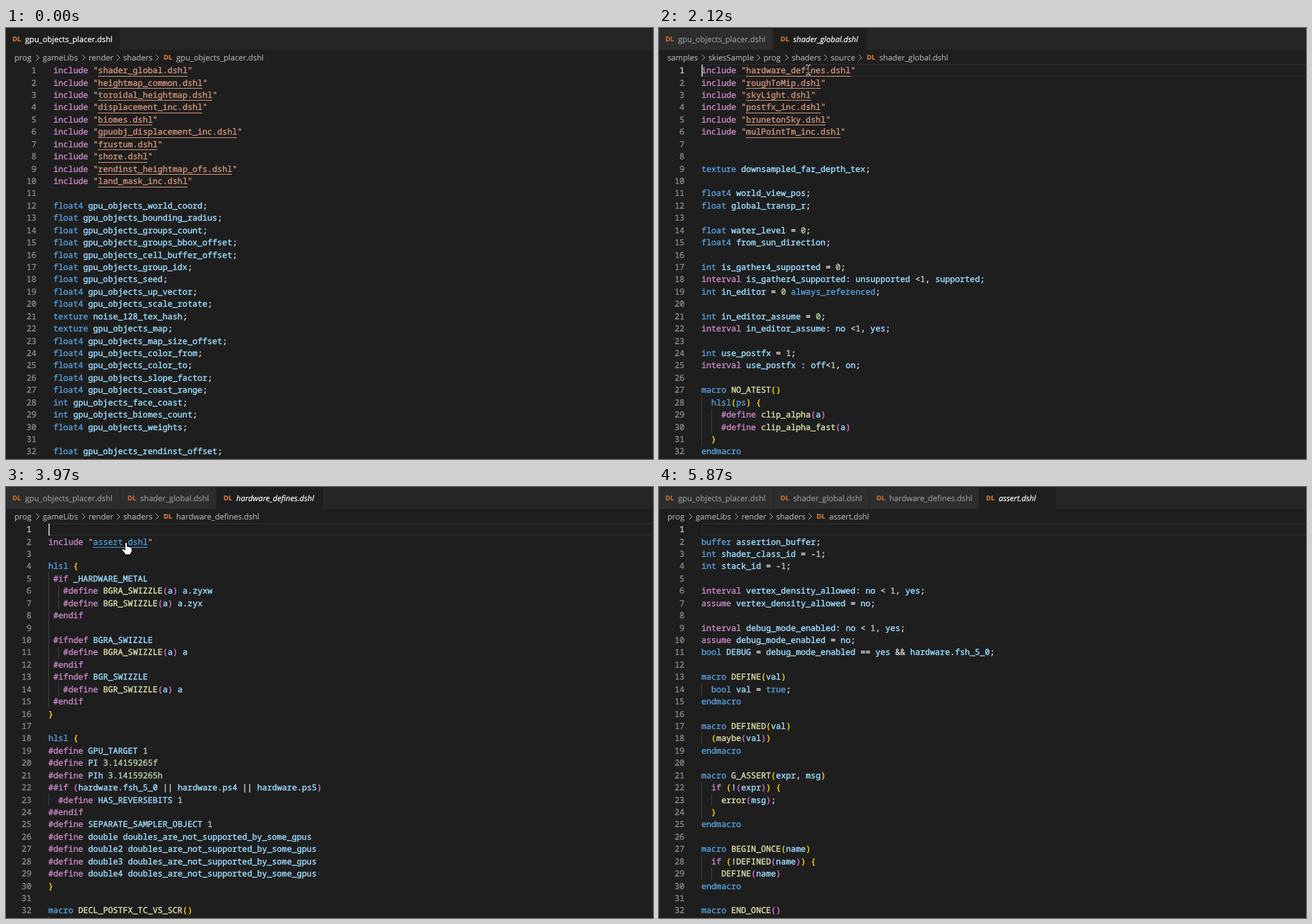
These frames come from a looping animation (916x611 px, 6.07 s). An HTML page with a canvas:

```html
<!DOCTYPE html>
<html lang="en">
<head>
<meta charset="utf-8">
<title>Following shader includes</title>
<style>
html, body { margin: 0; height: 100%; overflow: hidden; background: #1e1e1e; }
canvas { display: block; }
</style>
</head>
<body>
<canvas id="stage" width="916" height="611"></canvas>
<script>
const LOOP = 6070, STEP = 70, CHAR = 7.04, ROW = 17.43;
const ctx = document.getElementById('stage').getContext('2d');
const MONO = '11.73px "Noto Sans Mono", monospace';
const UI = '11.17px "Open Sans", sans-serif';
const BADGE = 'bold 9.5px "Open Sans", sans-serif';

const libs = { names: ['prog', 'gameLibs', 'render', 'shaders'], xs: [12, 52, 117, 166], badge: 223 };
const sample = {
  names: ['samples', 'skiesSample', 'prog', 'shaders', 'source'],
  xs: [12, 70, 148, 188, 243], badge: 294
};

// open: time the tab appears; link: [row, hover time]; click: [time, column]; blink: caret phase
const files = [
  { name: 'gpu_objects_placer.dshl', tab: 0, end: 161, previewEnd: 161, path: libs, left: 67,
    open: -STEP, link: [0, 1510], click: [1650, 20], code: `include "shader_global.dshl"
include "heightmap_common.dshl"
include "toroidal_heightmap.dshl"
include "displacement_inc.dshl"
include "biomes.dshl"
include "gpuobj_displacement_inc.dshl"
include "frustum.dshl"
include "shore.dshl"
include "rendinst_heightmap_ofs.dshl"
include "land_mask_inc.dshl"

float4 gpu_objects_world_coord;
float gpu_objects_bounding_radius;
float gpu_objects_groups_count;
float gpu_objects_groups_bbox_offset;
float gpu_objects_cell_buffer_offset;
float gpu_objects_group_idx;
float gpu_objects_seed;
float4 gpu_objects_up_vector;
float4 gpu_objects_scale_rotate;
texture noise_128_tex_hash;
texture gpu_objects_map;
float4 gpu_objects_map_size_offset;
float4 gpu_objects_color_from;
float4 gpu_objects_color_to;
float4 gpu_objects_slope_factor;
float4 gpu_objects_coast_range;
int gpu_objects_face_coast;
int gpu_objects_biomes_count;
float4 gpu_objects_weights;

float gpu_objects_rendinst_offset;` },
  { name: 'shader_global.dshl', tab: 162, end: 297, previewEnd: 294, path: sample, left: 60,
    open: 1720, blink: 1790, link: [0, 2470], click: [2810, 26], code: `include "hardware_defines.dshl"
include "roughToMip.dshl"
include "skyLight.dshl"
include "postfx_inc.dshl"
include "brunetonSky.dshl"
include "mulPointTm_inc.dshl"


texture downsampled_far_depth_tex;

float4 world_view_pos;
float global_transp_r;

float water_level = 0;
float4 from_sun_direction;

int is_gather4_supported = 0;
interval is_gather4_supported: unsupported <1, supported;
int in_editor = 0 always_referenced;

int in_editor_assume = 0;
interval in_editor_assume: no <1, yes;

int use_postfx = 1;
interval use_postfx : off<1, on;

macro NO_ATEST()
  hlsl(ps) {
    #define clip_alpha(a)
    #define clip_alpha_fast(a)
  }
endmacro` },
  { name: 'hardware_defines.dshl', tab: 298, end: 452, previewEnd: 449, path: libs, left: 60,
    open: 2940, blink: 2965, link: [1, 3900], code: `
include "assert.dshl"

hlsl {
 #if _HARDWARE_METAL
   #define BGRA_SWIZZLE(a) a.zyxw
   #define BGR_SWIZZLE(a) a.zyx
 #endif
${' '}
 #ifndef BGRA_SWIZZLE
   #define BGRA_SWIZZLE(a) a
 #endif
 #ifndef BGR_SWIZZLE
   #define BGR_SWIZZLE(a) a
 #endif
}

hlsl {
#define GPU_TARGET 1
#define PI 3.14159265f
#define PIh 3.14159265h
##if (hardware.fsh_5_0 || hardware.ps4 || hardware.ps5)
  #define HAS_REVERSEBITS 1
##endif
#define SEPARATE_SAMPLER_OBJECT 1
#define double doubles_are_not_supported_by_some_gpus
#define double2 doubles_are_not_supported_by_some_gpus
#define double3 doubles_are_not_supported_by_some_gpus
#define double4 doubles_are_not_supported_by_some_gpus
}

macro DECL_POSTFX_TC_VS_SCR()
${'  '}` },
  { name: 'assert.dshl', tab: 453, end: 562, previewEnd: 562, path: libs, left: 60,
    open: 4240, blink: 4350, code: `
buffer assertion_buffer;
int shader_class_id = -1;
int stack_id = -1;

interval vertex_density_allowed: no < 1, yes;
assume vertex_density_allowed = no;

interval debug_mode_enabled: no < 1, yes;
assume debug_mode_enabled = no;
bool DEBUG = debug_mode_enabled == yes && hardware.fsh_5_0;

macro DEFINE(val)
  bool val = true;
endmacro

macro DEFINED(val)
  (maybe(val))
endmacro

macro G_ASSERT(expr, msg)
  if (!(expr)) {
    error(msg);
  }
endmacro

macro BEGIN_ONCE(name)
  if (!DEFINED(name)) {
    DEFINE(name)
endmacro

macro END_ONCE()
${'  '}` }
];

const TYPES = /^(float4?|int|bool|texture|buffer|true|hlsl|ps|macro|endmacro|always_referenced)$/;
const CONTROL = /^(include|interval|assume|if|#.*)$/;
const BRACKETS = ['#ffd700', '#da70d6', '#179fff'];

function colorOf(word, next) {
  if (word[0] === '"') return '#ce9178';
  if (CONTROL.test(word)) return '#c586c0';
  if (TYPES.test(word)) return '#569cd6';
  if (/^\d/.test(word)) return '#b5cea8';
  if (/^\w/.test(word)) return next === '(' ? '#dcdcaa' : '#9cdcfe';
  return '#d4d4d4';
}

function tokenize(code) {
  let depth = 0;
  return code.split('\n').map(line => {
    const tokens = [];
    for (const m of line.matchAll(/"[^"]*"|#+\w+|[A-Za-z_]\w*|\d[\w.]*|\S/g)) {
      const text = m[0];
      let color = colorOf(text, line[m.index + text.length]);
      if (/^[({]/.test(text)) color = BRACKETS[depth++ % 3];
      else if (/^[)}]/.test(text)) color = BRACKETS[(depth = Math.max(0, depth - 1)) % 3];
      tokens.push({ text, color, col: m.index });
    }
    return { tokens, indent: line.match(/^ */)[0].length };
  });
}
files.forEach(f => f.lines = tokenize(f.code));

function rect(color, x, y, w, h) {
  ctx.fillStyle = color;
  ctx.fillRect(x, y, w, h);
}

// A hairline stroke gives the text its slightly heavier screen weight
function label(text, x, y, color, font = UI) {
  ctx.font = font;
  ctx.fillStyle = ctx.strokeStyle = color;
  ctx.lineWidth = font === MONO ? 0.4 : 0.2;
  ctx.fillText(text, x, y);
  ctx.strokeText(text, x, y);
}

function drawTabs(current) {
  rect('#252526', 0, 0, 916, 31);
  files.slice(0, current + 1).forEach((f, i) => {
    const active = i === current;
    rect(active ? '#1e1e1e' : '#2d2d2d', f.tab, 0, (active ? f.previewEnd : f.end) - f.tab, 31);
    label('DL', f.tab + (i ? 10 : 9), 19, active ? '#d0733c' : '#c06a38', BADGE);
    label(f.name, f.tab + (i ? 28 : 27), 20, active ? '#fff' : '#969696',
      active && i ? 'italic ' + UI : UI);
  });
  rect('#1e1e1e', 0, 0, 916, 1);
}

function chevron(x) {
  ctx.strokeStyle = '#a9a9a9';
  ctx.lineWidth = 1;
  ctx.beginPath();
  ctx.moveTo(x - 2, 37.5);
  ctx.lineTo(x + 2.3, 41.8);
  ctx.lineTo(x - 2, 46.1);
  ctx.stroke();
}

function drawPath({ path, name }) {
  path.names.forEach((part, i) => {
    label(part, path.xs[i], 46, '#a9a9a9');
    chevron(i + 1 < path.xs.length ? path.xs[i + 1] - 7.3 : path.badge - 9.3);
  });
  label('DL', path.badge, 45, '#d0733c', BADGE);
  label(name, path.badge + 18, 46, '#a9a9a9');
}

function drawCode(f, t) {
  const clicked = f.click && t >= f.click[0];
  const focused = clicked || f.blink !== undefined;
  if (focused) {
    ctx.strokeStyle = '#282828';
    ctx.lineWidth = 2;
    ctx.strokeRect(f.left + 1, 52, 916, 16);
  }
  f.lines.forEach((line, row) => {
    const y = Math.round(64.15 + row * ROW), top = Math.round(51.5 + row * ROW);
    for (let c = 0; c < line.indent; c += 2) {
      rect('#404040', Math.round(f.left + c * CHAR), top, 1, Math.round(51.5 + (row + 1) * ROW) - top);
    }
    const number = String(row + 1);
    label(number, f.left - 24 - number.length * CHAR, y, focused && !row ? '#c6c6c6' : '#858585', MONO);
    const hot = f.link && f.link[0] === row && t >= f.link[1];
    for (const { text, color, col } of line.tokens) {
      const x = f.left + col * CHAR;
      if (text[0] !== '"') { label(text, x, y, color, MONO); continue; }
      const inner = text.slice(1, -1), width = inner.length * CHAR;
      const linkColor = hot ? '#4e94ce' : color;
      label('"', x, y, color, MONO);
      label(inner, x + CHAR, y, linkColor, MONO);
      rect(linkColor, Math.round(x + CHAR), Math.floor(68.135 + row * ROW), Math.round(width), 1);
      label('"', x + CHAR + width, y, color, MONO);
    }
  });
  const blinkOn = focused && (t - f.blink + 1000) % 1000 < 500;
  if (clicked || blinkOn) {
    rect('#aeafad', Math.round(f.left + (clicked ? f.click[1] * CHAR : 0)), 52, 2, 17);
  }
}

// Pointer waypoints: time, x, y
const route = [
  [460, 353, 511], [1020, 184, 99], [1440, 206, 58], [1920, 206, 58], [2540, 248, 64],
  [2610, 247, 63], [3200, 247, 63], [3830, 170, 78], [5040, 170, 78], [5730, 353, 546], [5870, 391, 669]
];
const shapes = [
  [460, 'beam'], [1510, 'hand'], [1650, 'beam'], [1720, 'arrow'], [1790, 'beam'], [2470, 'hand'],
  [2810, 'beam'], [2940, 'arrow'], [3010, 'beam'], [3900, 'hand'], [4170, 'beam'], [4240, 'arrow'], [4310, 'beam']
];
const outlines = {
  arrow: new Path2D('M0 0V14.5L3.3 11.4L5.6 16.6L8 15.5L5.7 10.6H10.3Z'),
  hand: new Path2D('M-1.6 1.5Q0 -.6 1.6 1.5V6.5Q3 5.4 4 7Q5.6 6.2 6.5 7.8Q8.3 7.4 8.4 9.3V12.5' +
    'Q8.2 14.5 6.6 16V18H-1.8V16.3L-5.6 11.6Q-6.6 9.6 -4.4 9.4L-1.6 11.2Z')
};

function pointerAt(t) {
  const i = route.findLastIndex(p => p[0] <= t);
  const [t0, x0, y0] = route[i], [t1, x1, y1] = route[i + 1];
  const p = Math.floor((t - t0) / STEP) * STEP / (t1 - t0);
  const e = (1 - Math.cos(Math.PI * p)) / 2;
  return [x0 + (x1 - x0) * e, y0 + (y1 - y0) * e].map(Math.round);
}

function drawPointer(t) {
  if (t < 460 || t >= 5870) return;
  const shape = shapes.findLast(s => s[0] <= t)[1];
  ctx.save();
  ctx.translate(...pointerAt(t));
  if (shape === 'beam') {
    ctx.globalCompositeOperation = 'difference';
    rect('#fff', 0, -6, 1, 13);
    for (const y of [-7, 7]) {
      rect('#fff', -3, y, 3, 1);
      rect('#fff', 1, y, 3, 1);
    }
  } else {
    ctx.fillStyle = '#fff';
    ctx.strokeStyle = '#000';
    ctx.lineWidth = 1;
    ctx.fill(outlines[shape]);
    ctx.stroke(outlines[shape]);
  }
  ctx.restore();
}

function draw(t) {
  rect('#1e1e1e', 0, 0, 916, 611);
  const current = files.findLastIndex(f => f.open <= t), file = files[current];
  drawTabs(current);
  drawPath(file);
  if (t >= file.open + STEP) drawCode(file, t);
  drawPointer(t);
}

ctx.textRendering = 'geometricPrecision';
ctx.lineJoin = 'round';
const start = performance.now();
(function tick() {
  draw((performance.now() - start) % LOOP);
  requestAnimationFrame(tick);
})();
</script>
</body>
</html>
```
